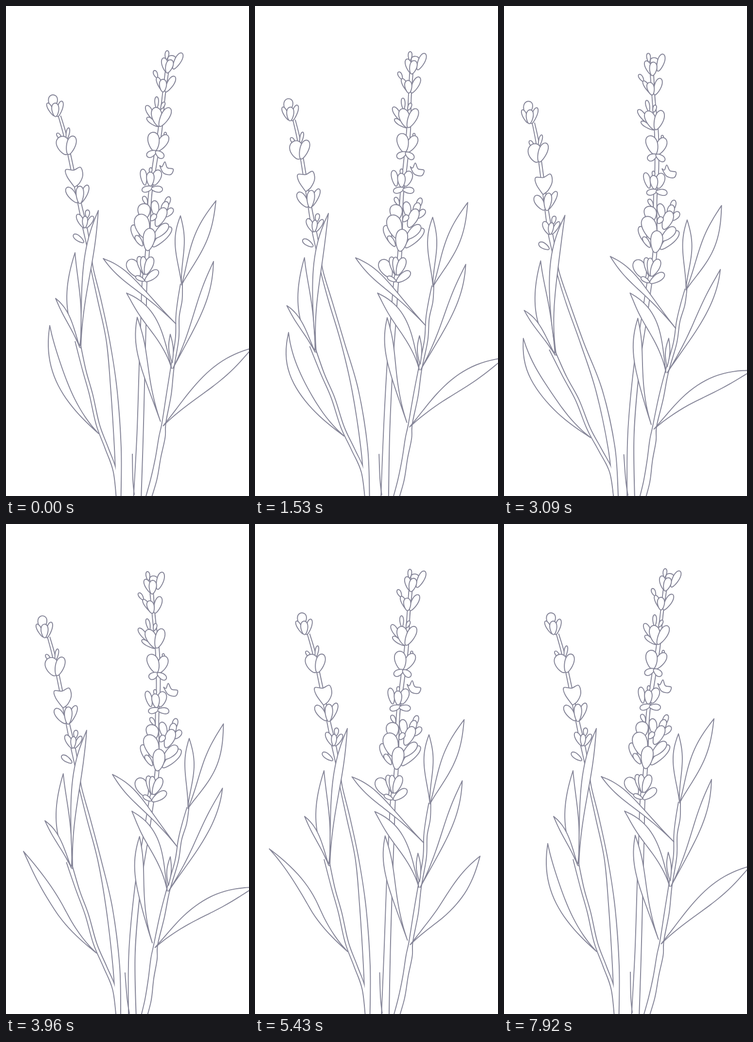
These frames come from a looping animation (500x1009 px, 7950 ms). An HTML page with a canvas:

```html
<!DOCTYPE html>
<html lang="en">
<head>
<meta charset="utf-8">
<title>Lavender in the wind</title>
<style>
  html, body { margin: 0; width: 100%; height: 100%; overflow: hidden; background: #fff; }
  canvas { display: block; }
</style>
</head>
<body>
<canvas id="stage" width="500" height="1009"></canvas>
<script>
const LOOP = 7950, STEP = 30, INK = '#858598', LINE = 1.9;
const ctx = document.getElementById('stage').getContext('2d');
const clamp = v => Math.min(1, Math.max(0, v));
const steps = n => Array.from({ length: n + 1 }, (_, i) => i / n);

// Smooth curve through flat x, value knots.
function curve(x, ...k) {
  const n = k.length / 2;
  if (x <= k[0]) return k[1];
  if (x >= k[2 * n - 2]) return k[2 * n - 1];
  let i = 0;
  while (x > k[2 * i + 2]) i++;
  const slope = j => {
    const a = Math.max(j - 1, 0), b = Math.min(j + 1, n - 1);
    return (k[2 * b + 1] - k[2 * a + 1]) / (k[2 * b] - k[2 * a]);
  };
  const h = k[2 * i + 2] - k[2 * i], u = (x - k[2 * i]) / h, v = 1 - u;
  return v * v * (1 + 2 * u) * k[2 * i + 1] + u * u * (1 + 2 * v) * k[2 * i + 3]
    + h * u * v * (v * slope(i) - u * slope(i + 1));
}

// Keyframes time, value joined by sine easing.
function ease(t, ...k) {
  if (t <= k[0]) return k[1];
  for (let i = 2; i < k.length; i += 2) {
    if (t < k[i]) {
      const u = (t - k[i - 2]) / (k[i] - k[i - 2]);
      return k[i - 1] + (k[i + 1] - k[i - 1]) * (1 - Math.cos(Math.PI * u)) / 2;
    }
  }
  return k[k.length - 1];
}

// Wind: each warp moves a resting point to its place at the current time.
let wind = {};
function blow(t) {
  wind = {
    leftTip: ease(t, 100, 0, 2750, 1, 5000, 0),
    leftMid: ease(t, 100, 0, 2750, 1, 4750, 0),
    sway: ease(t, 0, 0, 4100, 1, 6250, 0),
    bow: ease(t, 150, 0, 3600, 1, 3820, 1, 5160, 0),
    droop: ease(t, 500, 0, 2300, -19, 5100, 64, 7320, 0),
    lift: ease(t, 0, 0, 3000, -1.05, 3600, -1.05, 5400, 1.1, LOOP, 0)
  };
}

function left([x, y]) {
  const { leftTip, leftMid } = wind;
  const w = leftTip + (leftMid - leftTip) * clamp((y - 184) / 260);
  const bend = curve(y, 184, -49, 350, -63, 475, -72, 602, -65, 704, -50, 800, -26, 956, -3.5, 1009, -1);
  return [x + w * bend, y + w * (14 + .2 * clamp((y - 184) / 366) * (165 - x))];
}

function right([x, y]) {
  const { sway, bow } = wind;
  const swayX = curve(y, 92, -41, 275, -15, 350, -9, 482, -1, 591, -5, 747, -11, 863, -13, 1009, -7);
  const bowX = curve(y, 92, 0, 275, 14, 350, 20, 520, 21, 641, 12, 747, 2, 863, -4, 1009, -3);
  const swayTurn = curve(y, 92, -.12, 400, 0, 520, .03);
  const bowTurn = .07 * clamp((y - 340) / 150);
  return [x + sway * swayX + bow * bowX,
    y + sway * (5.5 + swayTurn * (x - 320)) + bow * (2 + bowTurn * (x - 320))];
}

// The low leaves also bend on their own.
function lowLeft([x, y]) {
  const u = wind.droop * Math.max(0, (790 - y) / 132) ** 2, [px, py] = left([x, y]);
  return [px - u, py + u * .18];
}

function lowRight([x, y]) {
  const q = wind.lift, [px, py] = right([x, y]);
  const u = Math.max(0, (Math.hypot(x - 323, y - 863) - 70) / 171) ** 1.7;
  return [px - u * (21 * q + 14 * q * q), py - u * 21 * q];
}

const stems = [], shapes = [];

// Stem through x, y, width triples.
function stem(warp, ...k) {
  const edges = [[], []];
  for (let i = 0; i < k.length; i += 3) {
    const r = (k[i + 2] - LINE / 2) / 2;
    edges[0].push([k[i] - r, k[i + 1]]);
    edges[1].unshift([k[i] + r, k[i + 1]]);
  }
  stems.push({ warp, edges });
}

// Leaf from base to tip along a quadratic axis, widest at "peak".
function leaf(warp, bx, by, cx, cy, tx, ty, width, peak) {
  const power = Math.log(.5) / Math.log(peak);
  const edge = side => steps(12).map(s => {
    const v = 1 - s;
    const dx = v * (cx - bx) + s * (tx - cx), dy = v * (cy - by) + s * (ty - cy);
    const r = side * width / 2 * Math.sin(Math.PI * s ** power) / Math.hypot(dx, dy);
    return [v * v * bx + 2 * v * s * cx + s * s * tx - dy * r,
      v * v * by + 2 * v * s * cy + s * s * ty + dx * r];
  });
  shapes.push({ warp, edges: [edge(1), edge(-1).reverse()] });
}

// Egg-shaped petal from base to tip.
function petal(warp, bx, by, tx, ty, width) {
  const dx = tx - bx, dy = ty - by, len = Math.hypot(dx, dy);
  const edge = steps(14).map(f => {
    const a = f * 2 * Math.PI, s = (1 - Math.cos(a)) / 2;
    const r = width / 2 * Math.sin(a) * (.7 + .5 * s) / len;
    return [bx + dx * s - dy * r, by + dy * s + dx * r];
  });
  shapes.push({ warp, edges: [edge] });
}

// Free closed outline.
function blob(warp, ...k) {
  const edge = [];
  for (let i = 0; i < k.length; i += 2) edge.push([k[i], k[i + 1]]);
  shapes.push({ warp, edges: [[...edge, edge[0]]] });
}

// Left plant
stem(left, 110, 226, 4, 121, 264, 5, 131, 310, 5, 150, 400, 6, 162, 455, 8, 171, 500, 6,
  177, 540, 4, 192, 605, 6, 210, 690, 6, 222, 790, 12, 230, 910, 13, 232, 1020, 8);
stem(left, 147, 690, 9, 161, 750, 6, 175, 800, 6, 189, 862, 6, 207, 910, 6, 224, 958, 6, 231, 1020, 6);
leaf(left, 152, 700, 131, 604, 142, 508, 28, .45);
leaf(left, 152, 704, 129, 637, 102, 602, 10, .6);
leaf(left, 154, 705, 157, 552, 190, 421, 17, .66);
leaf(lowLeft, 191, 881, 93, 786, 90, 658, 21, .6);

petal(left, 96, 210, 97, 183, 19);
petal(left, 99, 226, 85, 200, 9);
petal(left, 106, 228, 115, 196, 11);
petal(left, 102, 228, 101, 200, 15);

petal(left, 115, 276, 105, 262, 7);
petal(left, 125, 274, 129, 251, 7);
petal(left, 125, 306, 112, 269, 27);
petal(left, 128, 306, 139, 268, 19);

blob(left, 141, 373, 126, 352, 123, 337, 139, 338, 153, 332, 158, 348, 151, 365);
petal(left, 147, 405, 125, 374, 16);
petal(left, 154, 405, 168, 369, 13);
petal(left, 152, 407, 152, 371, 16);

petal(left, 167, 436, 168, 420, 9);
petal(left, 161, 457, 147, 429, 12);
petal(left, 165, 457, 179, 433, 10);
petal(left, 162, 457, 163, 433, 11);
petal(left, 160, 487, 139, 471, 11);

// Right plant
stem(right, 331, 136, 6, 324, 190, 5, 317, 255, 7, 306, 325, 7, 296, 395, 6, 291, 505, 7,
  285, 570, 9, 283, 640, 10, 280, 740, 11, 276, 880, 12, 270, 1020, 15);
stem(right, 361, 572, 3, 358, 605, 8, 353, 640, 6, 352, 685, 6, 342, 747, 6, 335, 800, 9,
  325, 858, 7, 321, 888, 12, 313, 930, 10, 304, 975, 12, 291, 1020, 11);
blob(right, 260, 922, 261, 975, 264, 1006, 261, 975);
leaf(right, 361, 572, 355, 500, 359, 432, 19, .62);
leaf(right, 361, 575, 395, 492, 432, 401, 27, .58);
leaf(right, 343, 747, 401, 636, 427, 526, 17, .66);
leaf(right, 350, 655, 265, 569, 200, 520, 17, .68);
leaf(right, 341, 747, 315, 651, 248, 591, 24, .64);
leaf(right, 342, 735, 339, 705, 338, 676, 9, .5);
leaf(right, 318, 856, 277, 740, 270, 641, 18, .68);
leaf(lowRight, 323, 865, 415, 763, 507, 704, 30, .6);

petal(right, 330, 110, 332, 92, 8);
petal(right, 340, 120, 342, 102, 17);
petal(right, 331, 137, 324, 107, 13);
petal(right, 344, 130, 362, 97, 14);
petal(right, 331, 138, 340, 111, 15);

petal(right, 311, 148, 305, 133, 8);
petal(right, 324, 177, 311, 147, 10);
petal(right, 328, 177, 347, 145, 14);
petal(right, 323, 177, 323, 151, 15);

petal(right, 310, 210, 310, 187, 8);
petal(right, 319, 212, 326, 198, 7);
petal(right, 314, 248, 290, 230, 10);
petal(right, 304, 234, 289, 205, 12);
petal(right, 315, 248, 307, 209, 22);
petal(right, 316, 248, 337, 210, 18);

petal(right, 327, 269, 328, 260, 5);
petal(right, 310, 299, 332, 266, 19);
petal(right, 306, 299, 302, 260, 24);
petal(right, 309, 299, 290, 309, 13);
petal(right, 308, 299, 324, 312, 13);

blob(right, 316, 328, 321, 331, 327, 321, 332, 333, 344, 336, 339, 347, 324, 344);
petal(right, 286, 369, 281, 336, 13);
petal(right, 297, 345, 298, 333, 6);
petal(right, 304, 369, 315, 338, 18);
petal(right, 297, 371, 297, 342, 16);
petal(right, 302, 373, 280, 380, 12);
petal(right, 299, 376, 322, 378, 13);

petal(right, 290, 408, 283, 392, 9);
petal(right, 326, 418, 336, 393, 11);
petal(right, 328, 434, 343, 417, 12);
petal(right, 309, 434, 305, 401, 16);
petal(right, 320, 430, 331, 403, 14);
petal(right, 284, 440, 284, 407, 26);
petal(right, 302, 496, 340, 456, 17);
petal(right, 304, 478, 333, 449, 18);
petal(right, 309, 454, 327, 416, 20);
petal(right, 298, 442, 308, 429, 11);
petal(right, 272, 486, 261, 451, 15);
petal(right, 287, 478, 275, 429, 31);
petal(right, 281, 494, 267, 473, 11);
petal(right, 291, 504, 297, 458, 25);

petal(right, 274, 558, 253, 523, 25);
petal(right, 285, 553, 273, 516, 14);
petal(right, 285, 553, 282, 516, 13);
petal(right, 287, 553, 300, 517, 17);
petal(right, 286, 567, 313, 545, 16);
petal(right, 285, 566, 267, 557, 9);

// Catmull-Rom spline; continues the current path when "join" is set.
function trace(p, join) {
  if (join) ctx.lineTo(...p[0]);
  else ctx.moveTo(...p[0]);
  for (let i = 0; i < p.length - 1; i++) {
    const a = p[i], b = p[i + 1], before = p[i - 1] || a, after = p[i + 2] || b;
    ctx.bezierCurveTo(a[0] + (b[0] - before[0]) / 6, a[1] + (b[1] - before[1]) / 6,
      b[0] - (after[0] - a[0]) / 6, b[1] - (after[1] - a[1]) / 6, b[0], b[1]);
  }
}

function outline({ warp, edges }, joined) {
  ctx.beginPath();
  edges.forEach((e, i) => trace(e.map(warp), joined && i > 0));
}

function draw(now) {
  blow(Math.floor((now % LOOP) / STEP) * STEP);
  ctx.fillStyle = '#fff';
  ctx.fillRect(0, 0, 500, 1009);
  ctx.strokeStyle = INK;
  ctx.lineJoin = 'round';

  // Inking all stems before filling them lets the forks merge.
  ctx.lineWidth = LINE * 2;
  for (const s of stems) { outline(s, false); ctx.stroke(); }
  for (const s of stems) { outline(s, true); ctx.fill(); }

  ctx.lineWidth = LINE;
  for (const s of shapes) { outline(s, true); ctx.fill(); ctx.stroke(); }
}

function frame() {
  draw(performance.now());
  requestAnimationFrame(frame);
}
frame();
</script>
</body>
</html>
```
